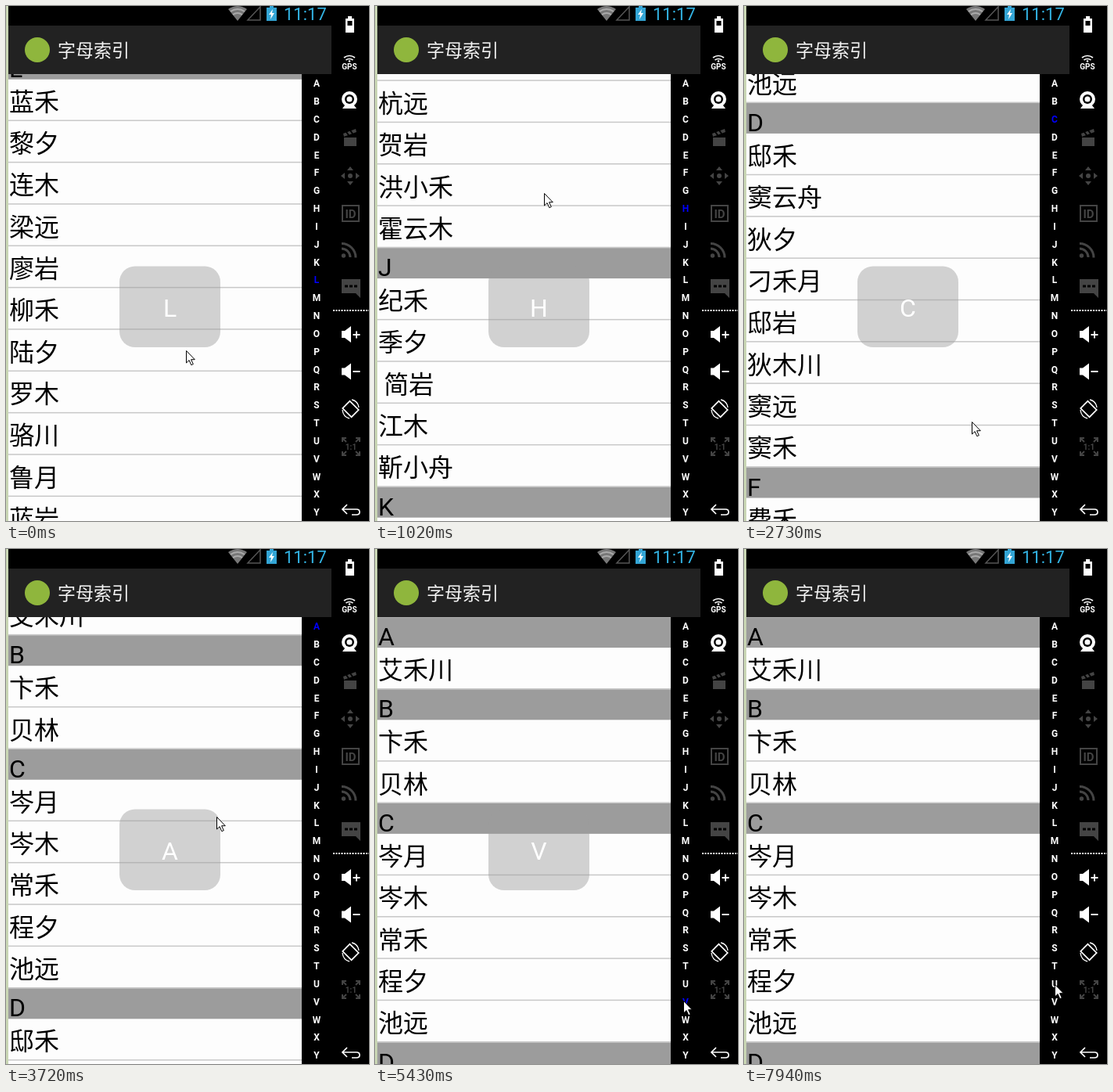
These frames come from a looping animation (464 by 658 pixels, 8 s). An HTML page:

```html
<!DOCTYPE html>
<html lang="zh-CN">
<head>
<meta charset="utf-8">
<title>字母索引</title>
<style>
  html, body { margin: 0; height: 100%; overflow: hidden; background: #000; }
  svg { display: block; width: 464px; height: 658px; }
  text { font-family: Roboto, 'Noto Sans CJK SC', 'Noto Sans CJK', sans-serif; white-space: pre; }
  .cjk { font-family: 'Noto Sans CJK SC', 'Noto Sans CJK', sans-serif; }
  #list text { font-size: 32px; }
  #index text { font-size: 12px; font-weight: bold; fill: #fff; text-anchor: middle; }
  #index .on { fill: #00f; }
  .on-icon { fill: #fff; }
  .off-icon { fill: #444; }
  .line { fill: none; stroke: #fff; stroke-width: 1.7; }
  .off-line { fill: none; stroke: #444; stroke-width: 2; }
</style>
</head>
<body>
<svg viewBox="0 0 464 658">
  <clipPath id="view"><rect x="3" y="87" width="375" height="571"/></clipPath>
  <rect width="3" height="658" fill="#c9d6b4"/>
  <rect x="3" y="87" width="375" height="571" fill="#fdfdfd"/>
  <g clip-path="url(#view)"><g id="list"></g></g>

  <!-- status and title bars -->
  <rect x="3" width="413" height="25"/>
  <rect x="3" y="25" width="413" height="62" fill="#222"/>
  <path d="M284 4Q296-4 308 4L296 19Z" fill="#777"/>
  <path d="M287 7Q296 1 305 7M290 11Q296 7 302 11" fill="none" stroke="#aaa" stroke-width="2"/>
  <path d="M309 18H325V1Z" fill="none" stroke="#555" stroke-width="1.5"/>
  <path d="M333 2h4V0h5v2h4v17h-13Z" fill="#33a5d5"/>
  <path d="M341 4l-5 7h3l-1 6 5-8h-3Z" fill="#fff"/>
  <text x="355" y="18" font-size="22" fill="#33b5e5">11:17</text>
  <circle cx="40" cy="56" r="16" fill="#8fb63d"/>
  <text class="cjk" x="66" y="64.500" font-size="23" fill="#f3f3f3">字母索引</text>

  <rect x="378" y="87" width="38" height="571"/>
  <g id="index"></g>

  <!-- emulator tool bar -->
  <rect x="416" width="48" height="658"/>
  <path class="on-icon" d="M434 16h3v-3h5v3h3v18h-11Z"/>
  <rect x="436.500" y="19" width="6" height="6"/>
  <path class="line" d="M432 66q7-5 14 0M434.500 69q4.500-3 9 0"/>
  <circle class="on-icon" cx="439" cy="70.500" r="1.300"/>
  <text x="439" y="81" font-size="10" font-weight="bold" fill="#fff" text-anchor="middle">GPS</text>
  <circle class="on-icon" cx="439" cy="119" r="10"/>
  <circle cx="439" cy="119" r="6"/>
  <circle class="on-icon" cx="439" cy="119" r="3.500"/>
  <path class="on-icon" d="M433 127h12l3 4h-18Z"/>
  <path class="off-icon" d="M432 168h16v11h-16ZM431 163l16-6 1 4-16 6Z"/>
  <path d="M435 161l3 4M440 159l3 4" stroke="#000" stroke-width="2"/>
  <path class="off-icon" d="M440 205l4 5h-8ZM440 229l4-5h-8ZM428 217l5-4v8ZM452 217l-5-4v8Z"/>
  <circle class="off-icon" cx="440" cy="217" r="3"/>
  <rect class="off-line" x="430" y="255" width="21" height="20"/>
  <text x="440.500" y="270.500" font-size="15" font-weight="bold" fill="#444" text-anchor="middle">ID</text>
  <circle class="off-icon" cx="431.500" cy="319" r="2.700"/>
  <path class="off-line" style="stroke-width:3" d="M429 310a11 11 0 0 1 11 11M429 303.500a18 18 0 0 1 18 18"/>
  <path class="off-icon" d="M429 349h24v24l-6-6h-18Z"/>
  <path d="M433 358h4m2 0h4m2 0h4" stroke="#000" stroke-width="3"/>
  <path d="M418 389h46" stroke="#fff" stroke-width="2" stroke-dasharray="2 1.500"/>
  <path id="speaker" class="on-icon" d="M429 415h4l8-6v21l-8-6h-4Z"/>
  <use href="#speaker" y="47.500"/>
  <path d="M443.500 420h9m-4.500-4.500v9M443.500 467h9" stroke="#fff" stroke-width="2"/>
  <rect class="line" x="434" y="507" width="13" height="16" transform="rotate(-45 440.500 515)"/>
  <path class="line" style="stroke-width:1.300" d="M430 516q1 9 9 11M451 513q-1-8-9-10"/>
  <path class="off-line" d="M430 557v-5h5m-5 0l5 5M452 557v-5h-5m5 0l-5 5M430 569v5h5m-5 0l5-5M452 569v5h-5m5 0l-5-5"/>
  <text x="441" y="567" font-size="10" font-weight="bold" fill="#444" text-anchor="middle">1:1</text>
  <path class="line" d="M436 637l-6 6 6 6M430 643h18q4 0 4 3.500t-4 3.500h-6"/>

  <g id="bubble">
    <rect x="145" y="332.500" width="129" height="103.500" rx="20" fill="#9c9c9c" fill-opacity=".45"/>
    <text id="letter" x="209.500" y="397" font-size="32" fill="#fff" text-anchor="middle"></text>
  </g>
  <path id="cursor" d="M.5.5V16l3.600-3.400 2.700 6.100 2.500-1.100-2.700-5.900h4.700Z" fill="#fff" stroke="#000"/>
</svg>

<script>
const $ = id => document.getElementById(id);
const TOP = 87.2, ROW = 160 / 3, HEAD = 350 / 9, LOOP = 8000, REFRESH = 135;

const sections = {
  A: '艾禾川',
  B: '卞禾,贝林',
  C: '岑月,岑木,常禾,程夕,池远',
  D: '邸禾,窦云舟,狄夕,刁禾月,邸岩,狄木川,窦远,窦禾',
  F: '费禾',
  G: '甘木舟,葛夕,耿禾,古月川,桂 岩',
  H: '贺夕,洪木月,霍禾,胡夕川,杭远,贺岩,洪小禾,霍云木',
  J: '纪禾,季夕, 简岩,江木,靳小舟',
  K: '柯远,康禾',
  L: '蓝禾,黎夕,连木,梁远,廖岩,柳禾,陆夕,罗木,骆川,鲁月,蓝岩,柳远'
};

// turning points of the drags: [refresh count, scroll offset, pointer x, pointer y]
const poses = [
  [0, 2355.7, 230, 440],
  [4, 1709.9, 218, 282],
  [8, 1640, 216, 232],
  [12, 1078.6, 263, 543],
  [15, 1035, 270, 240],
  [20, 506.5, 291, 531],
  [21, 400, 308, 484],
  [23, 400, 271, 240],
  [27, 69.1, 269, 342],
  [30, 0, 272, 365],
  [35, 0, 392, 609],
  [38, 0, 394, 577],
  [44, 0, 394, 577],
  [46, 0, 397, 557],
  [60, 0, 397, 556]
];

function add(parent, tag, attrs, content = '') {
  const node = document.createElementNS('http://www.w3.org/2000/svg', tag);
  for (const name in attrs) node.setAttribute(name, attrs[name]);
  node.textContent = content;
  return parent.appendChild(node);
}

const starts = [];
let bottom = 0;
for (const [letter, names] of Object.entries(sections)) {
  starts.push([letter, bottom]);
  add($('list'), 'rect', { x: 3, y: bottom, width: 375, height: HEAD, fill: '#9c9c9c' });
  add($('list'), 'text', { x: 4, y: bottom + 36 }, letter);
  bottom += HEAD;
  for (const name of names.split(',')) {
    add($('list'), 'text', { x: 4, y: bottom + 40, class: 'cjk' }, name);
    bottom += ROW;
    add($('list'), 'rect', { x: 3, y: bottom - 1.5, width: 375, height: 1.5, fill: '#c8c8c8' });
  }
}

const indexLetters = [...'ABCDEFGHIJKLMNOPQRSTUVWXY'].map((letter, i) =>
  add($('index'), 'text', { x: 397, y: 103.3 + i * 22.83 }, letter));

// eased move from one pose to the next
function poseAt(step) {
  const i = poses.findIndex(pose => pose[0] > step);
  const [a, b] = [poses[i - 1], poses[i]];
  const k = (1 - Math.cos(Math.PI * (step - a[0]) / (b[0] - a[0]))) / 2;
  return a.slice(1).map((v, n) => v + (b[n + 1] - v) * k);
}

function draw(now) {
  const time = now % LOOP;
  const [scroll, x, y] = poseAt(Math.floor(time / REFRESH));
  const dragging = time < 4740;
  const pressed = time >= 5430 && time < 6610;
  const first = starts.filter(s => s[1] <= scroll).pop()[0];
  const letter = time < 5430 ? first : time < 6250 ? 'V' : 'U';
  const marked = time < 5310 || pressed;

  $('list').setAttribute('transform', `translate(0 ${TOP - scroll})`);
  $('cursor').setAttribute('transform', `translate(${Math.round(x)} ${Math.round(y)})`);
  $('letter').textContent = letter;
  $('bubble').style.display = dragging || (time >= 5430 && time < 7510) ? '' : 'none';
  for (const node of indexLetters)
    node.classList.toggle('on', marked && node.textContent === letter);
}

const origin = performance.now();
function loop() {
  draw(performance.now() - origin);
  requestAnimationFrame(loop);
}
loop();
</script>
</body>
</html>
```
